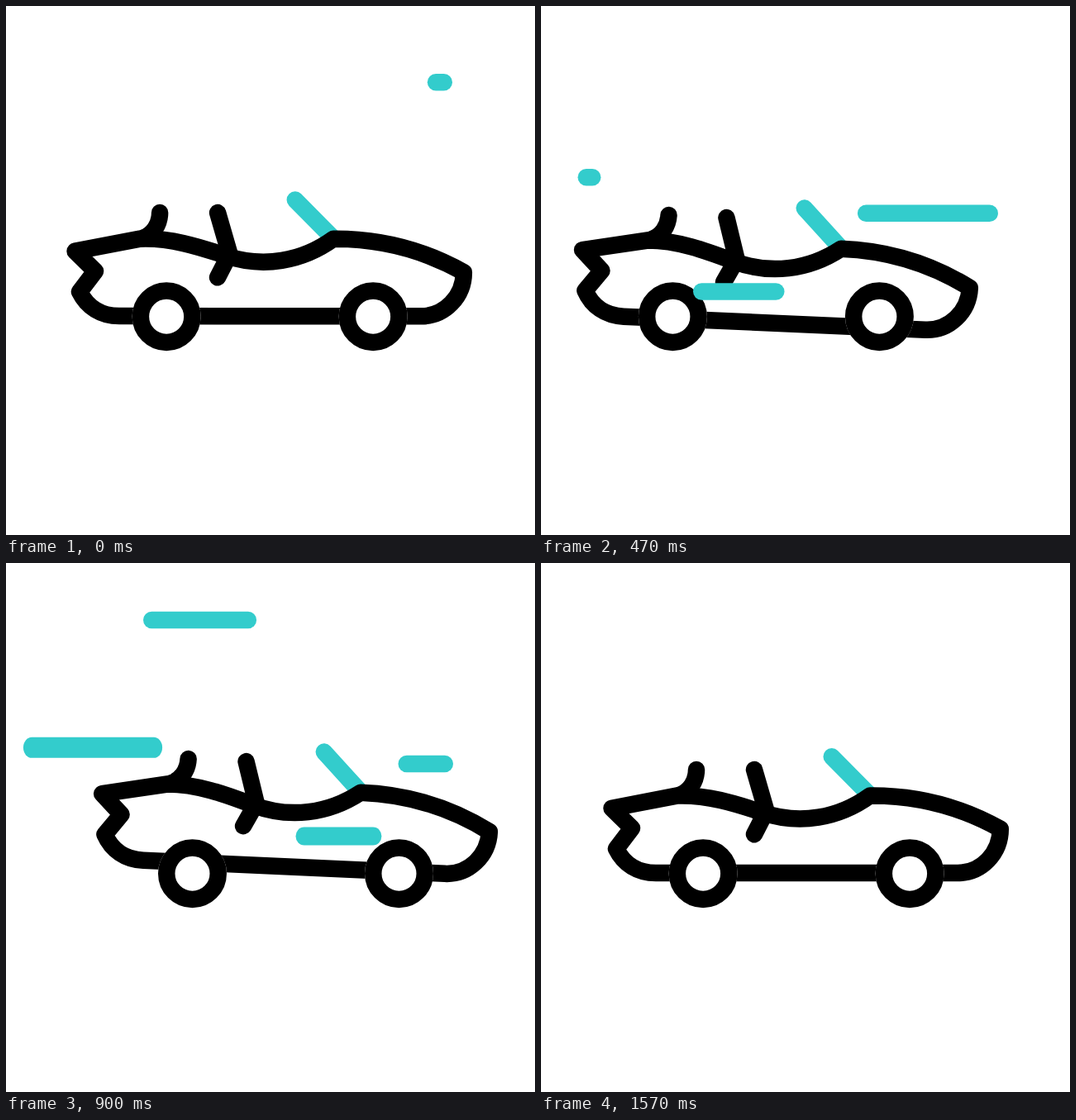
An HTML page that plays this animation: 640 px wide and 640 px high, repeating every 1.67 s.

```html
<!DOCTYPE html>
<html lang="en">
<head>
<meta charset="utf-8">
<title>Roadster</title>
<style>
  html, body { margin: 0; width: 100%; height: 100%; overflow: hidden; background: #fff; }
  svg { display: block; width: 100%; height: 100%; }
  .ink { fill: none; stroke: #000; stroke-width: 20.5; stroke-linecap: round; stroke-linejoin: round; }
  .glass { stroke: #33cccc; }
</style>
</head>
<body>
<svg viewBox="0 0 640 640">
  <g id="body" class="ink">
    <path class="glass" d="M351.7 234.3L398 281"/>
    <path d="M188 250C188 264 180 276 168 280.5"/>
    <path d="M258 250L272.5 300L258 328.2"/>
    <path d="M85.5 296.7L164 281.6C200 280 235 291 268 302C313 317 360 309 398 281.5
             C455 281 508 295 555.8 321.8C555.8 351 533 375 504 375L139 375
             C117 375 100 364 91 345.7L110 320.8Z"/>
  </g>
  <g id="wheels"></g>
  <g id="streaks" fill="#33cccc"></g>
</svg>
<script>
const LOOP = 1670, STEPS = 48;
const CAP = 20.5, TRAVEL = 9, LAG = 5.4; // streak thickness; steps per sweep, steps the tail waits
const $ = id => document.getElementById(id);

function add(parent, tag, attrs) {
  const el = document.createElementNS('http://www.w3.org/2000/svg', tag);
  for (const k in attrs) el.setAttribute(k, attrs[k]);
  return parent.appendChild(el);
}

function wheel(cx) {
  add($('wheels'), 'circle', { cx, cy: 375.75, r: 41.5, fill: '#fff' });
  add($('wheels'), 'circle', { cx, cy: 375.75, r: 31.25, class: 'ink' });
}

// A streak sweeps leftwards: its head leaves first, its tail follows.
function streak(y, right, start, span = 200, h = CAP) {
  const el = add($('streaks'), 'rect', { y: y - h / 2, height: h, rx: CAP / 2, ry: h / 2 });
  return n => {
    const head = span * ease((n - start) / TRAVEL);
    const tail = span * ease((n - start - LAG) / TRAVEL);
    const len = head - tail;
    el.setAttribute('x', right - CAP - head);
    el.setAttribute('width', len > 0.1 ? len + CAP : 0);
  };
}

function ease(s) {
  s = Math.max(0, Math.min(1, s));
  return s * s * (3 - 2 * s);
}

// Sum of eased moves, each [from step, to step, change]
const track = (...moves) => n =>
  moves.reduce((v, [a, b, d]) => v + d * ease((n - a) / (b - a)), 0);

wheel(196.1);
wheel(446.1);

const streaks = [
  streak(92.2, 540, -1.2),
  streak(207.2, 282, 0.6, 217),
  streak(345.5, 404.5, 3.8),
  streak(250.8, 599, 5.8),
  streak(330.5, 571, 16.6, 200, 22),
  streak(69.1, 386.5, 17.6),
  streak(223.3, 238, 18.7, 200, 25),
  streak(243, 541, 24.2)
];

const shift = track([-1.2, 9.7, -58.3], [9.7, 24, 99.6], [24, 34.6, -61.1], [34.6, 47, 19.8]);
const lift = track([-1, 11, 9.3], [13, 23, -17.8], [23, 39, 8.5]);
const tilt = track([-1, 11, 2.53], [29, 39, -2.53]);

function draw(ms) {
  // 30 steps per second, the last one held until the loop ends
  const n = Math.min(STEPS - 1, Math.floor((ms % LOOP + 3.34) * 0.03));
  const x = shift(n);
  $('wheels').setAttribute('transform', `translate(${x} 0)`);
  $('body').setAttribute('transform',
    `translate(${x} ${lift(n)}) rotate(${tilt(n)} 321.5 320)`);
  streaks.forEach(move => move(n));
}

let origin;
function tick(now) {
  origin ??= now;
  draw(now - origin);
  requestAnimationFrame(tick);
}
draw(0);
requestAnimationFrame(tick);
</script>
</body>
</html>
```
